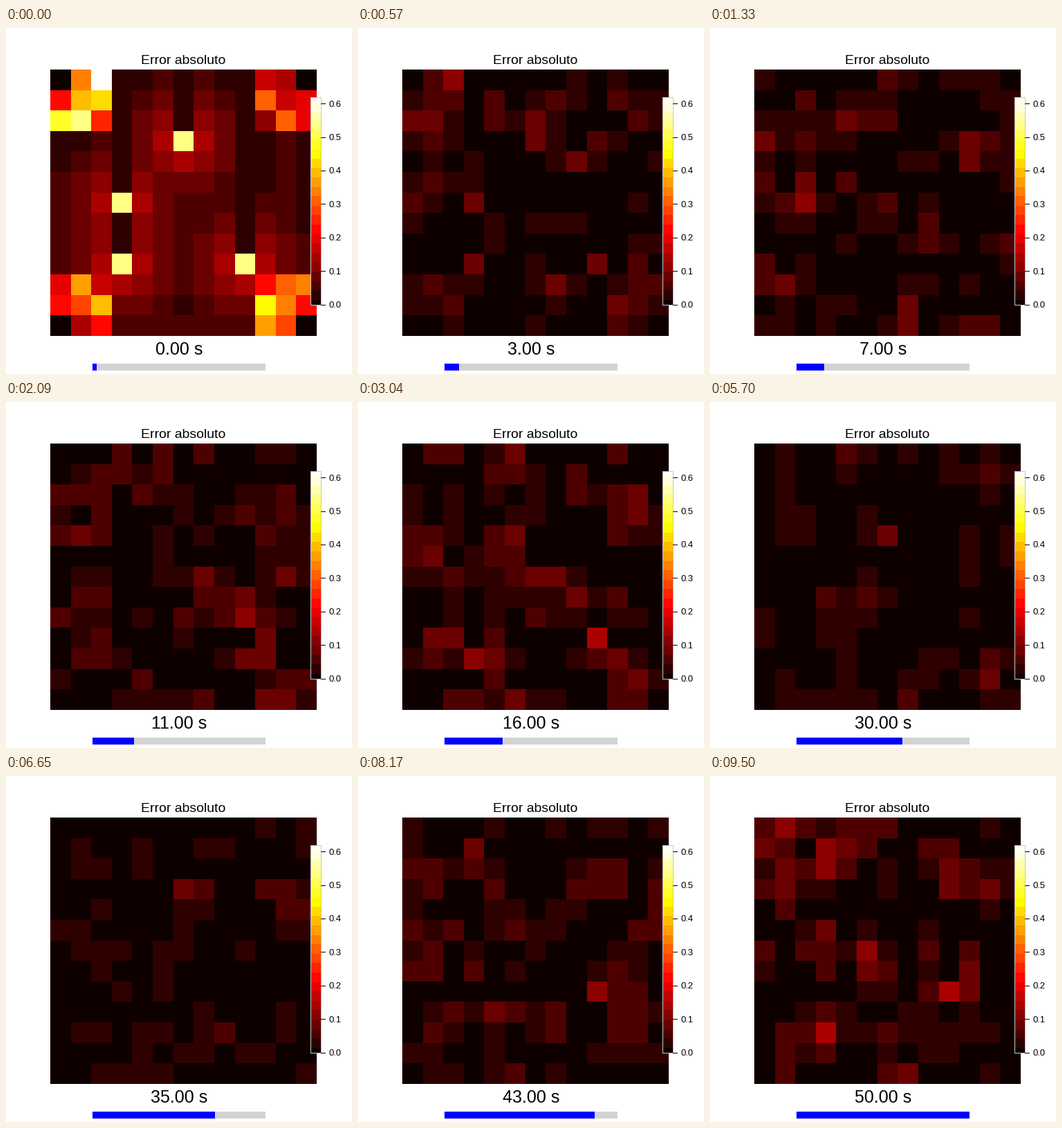
Recreate the animation shown at these times as a matplotlib script. Size 500 by 500 pixels, loop 9690 ms.

```python
import numpy as np
import matplotlib.pyplot as plt
from matplotlib.animation import FuncAnimation
from matplotlib.colors import ListedColormap
from matplotlib.patches import Rectangle

SIZE, N, FRAMES, TOP = 500, 13, 51, 22
PT = 0.72  # points per pixel at 100 dpi
SOURCES = [(3, 6), (6, 3), (9, 3), (9, 9)]
CORNERS = [(0, 0, 16), (0, 12, 9), (12, 0, 11), (12, 12, 14)]  # row, col, peak

plt.rcParams["font.family"] = "Liberation Sans"
hot = ListedColormap(plt.get_cmap("hot")((np.arange(TOP + 1) + 0.25) / TOP))
rows, cols = np.mgrid[:N, :N]


def corner_glow():
    """Three by three patches, dark in the very corner and hot around it."""
    glow = np.zeros((N, N))
    for r, c, peak in CORNERS:
        dr, dc = abs(rows - r), abs(cols - c)
        patch = (dr < 3) & (dc < 3)
        glow += patch * peak * np.sin(np.pi * (dr + dc) / 5)
    return glow


def start_field(glow, rng):
    """Large first error: four sources, the corners and a faint rim."""
    g = np.zeros((N, N))
    g[:, [0, -1]] = 1
    g[3:7, -2] = 2
    g[-2:] = [[1], [2]]
    for r, c in SOURCES:
        dist = np.hypot(rows - r, cols - c)
        g = np.maximum(g, np.round(8 * np.exp(-0.35 * dist) - 1))
    for r, c in SOURCES:
        g[:r, c] = np.minimum(g[:r, c], 1)  # shadow above each source
    for spot in SOURCES:
        g[spot] = 19
    g = np.where(glow > 0, glow * rng.uniform(0.7, 1.3, (N, N)), g)
    for r, c, _ in CORNERS:
        g[r, c] = 0
    g[0, 2] = TOP
    return np.round(g)


def build_fields():
    rng = np.random.default_rng(12)
    glow = corner_glow()
    start = start_field(glow, rng)
    noise = rng.normal(size=(N, N))
    fields = [start]
    for t in range(1, FRAMES):
        noise = 0.75 * noise + 0.66 * rng.normal(size=(N, N))
        soft = (noise + 0.5 * np.roll(noise, 1, 0) + 0.3 * np.roll(noise, 1, 1)) / 1.16
        activity = 0.93 + 0.25 * np.cos(2 * np.pi * (t - 14) / 36)
        field = 1.1 * activity * (soft + 0.75 + 0.02 * glow)
        field = np.maximum(field, start * np.exp(-t / 1.8))
        # the sources drift up and down and flare now and then
        for i, (r, c) in enumerate(SOURCES):
            drift = round(1.5 * np.sin(0.17 * (t - 16) + i * (i - 1)))
            flare = activity * (2.5 + 2.5 * np.cos(0.2 * (t - 16) + i - 3))
            field[r + drift, c] = max(field[r + drift, c], flare)
        fields.append(np.floor(np.clip(field, 0, TOP)))
    return fields


fields = build_fields()

fig = plt.figure(figsize=(SIZE / 100, SIZE / 100), dpi=100, facecolor="white")
ax = fig.add_axes([0, 0, 1, 1])
ax.axis("off")


def show(data, left, right, top, bottom, z):
    return ax.imshow(data, cmap=hot, vmin=-0.5, vmax=TOP + 0.5, aspect="auto",
                     interpolation="nearest", origin="upper",
                     extent=(left, right, bottom, top), zorder=z)


def label(x, y, text, px, ha="center"):
    return ax.text(x, y, text, fontsize=px * PT, ha=ha, va="baseline", color="black")


def box(x, y, w, h, **style):
    return ax.add_patch(Rectangle((x, y), w, h, **style))


heat = show(fields[0], 64, 449, 60, 445, 1)
show(np.round(np.linspace(TOP, 0, 300))[:, None], 440, 455, 100, 400, 2)
box(439.5, 99.5, 15, 300, fill=False, ec="#c8c8c8", lw=PT, zorder=3)
for i in range(7):
    y = 399.5 - i * 30 / 0.62
    ax.plot([455, 461], [y, y], color="black", lw=PT, zorder=3)
    label(466.5, y + 4.5, f"{i / 10:.1f}", 13, "left")

label(256, 52, "Error absoluto", 19.4)
clock = label(250, 472, "", 25)
box(125, 485, 250, 10, fc="#d3d3d3", lw=0, antialiased=False)
bar = box(125, 485, 0, 10, fc="#0000ff", lw=0, antialiased=False, zorder=4)

ax.set_xlim(0, SIZE)
ax.set_ylim(SIZE, 0)


def update(t):
    heat.set_data(fields[t])
    clock.set_text(f"{t:.2f} s")
    bar.set_width(min(250, round(250 * (t + 1) / FRAMES) + 1))
    return heat, clock, bar


anim = FuncAnimation(fig, update, frames=FRAMES, interval=190,
                     init_func=lambda: update(0), repeat=True, repeat_delay=0)
plt.show()
```
